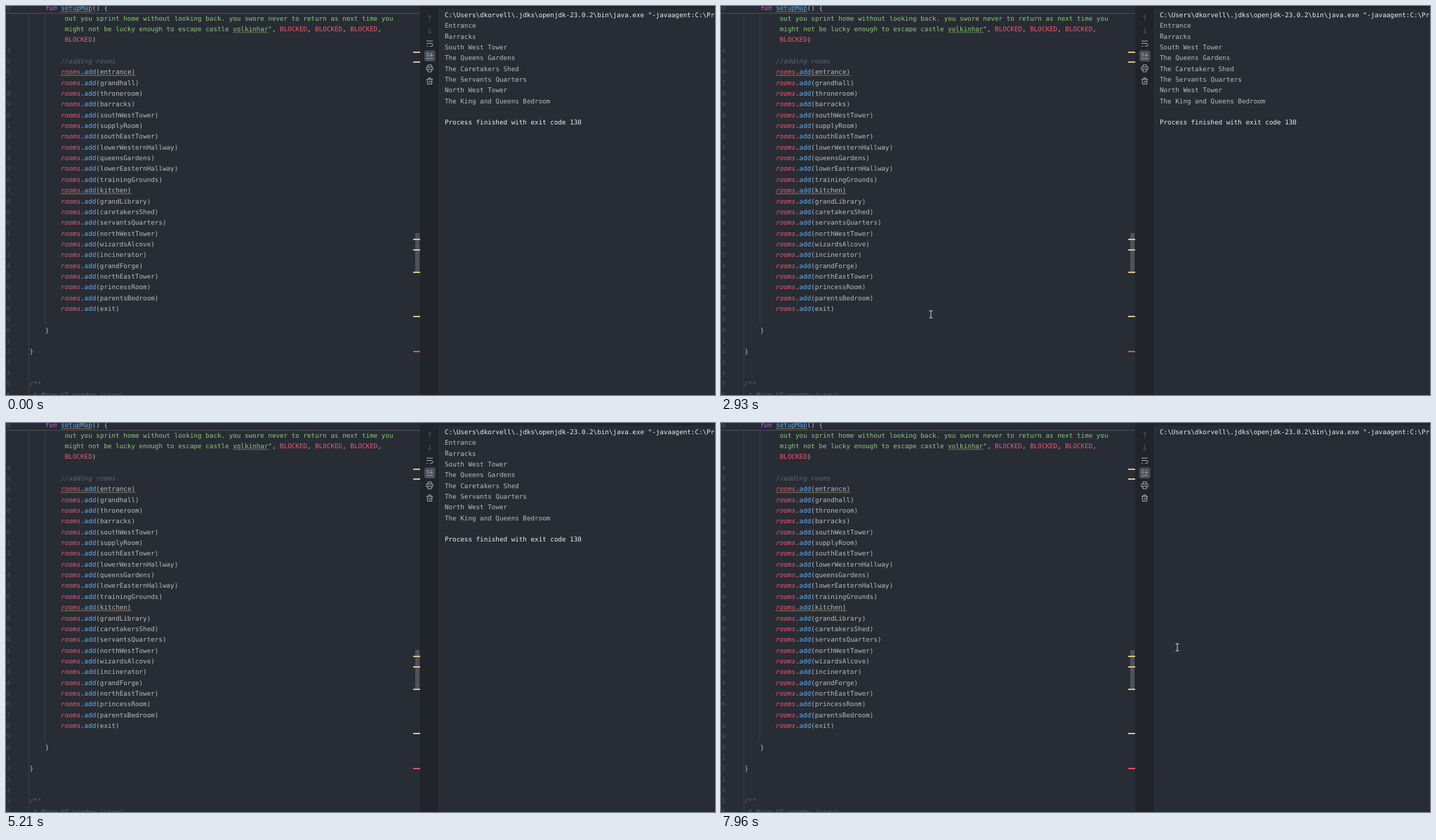
An HTML page that plays this animation: 1010 px wide and 555 px high, repeating every 8 s.

```html
<!DOCTYPE html>
<html lang="en">
<head>
<meta charset="utf-8">
<title>Code editor and console</title>
<style>
  html, body { margin: 0; width: 100%; height: 100%; overflow: hidden; background: #282c34; }
  svg { display: block; width: 1010px; height: 555px; }
  /* The tiny turn keeps baselines on fractional pixels. */
  #editor, #command, #output { transform: rotate(.01deg); }
  text {
    font: 9.26px "DejaVu Sans Mono", monospace;
    white-space: pre;
    text-rendering: geometricPrecision;
    fill: #bbbbbb;
  }
  .number { fill: #495162; text-anchor: end; }
  .keyword { fill: #d55fde; font-style: italic; }
  .call { fill: #61afef; }
  .field { fill: #ef596f; font-style: italic; }
  .constant { fill: #ef596f; }
  .string { fill: #89ca78; }
  .comment { fill: #5c6370; font-style: italic; }
  .system { fill: #eceef1; }
  .wave { fill: none; stroke: #a8925b; stroke-width: .8; }
  .typo { stroke: #6d9a62; }
  .icon { fill: none; stroke: #b4b7be; stroke-width: .9; }
  .dim { stroke: #50555f; }
</style>
</head>
<body>
<svg viewBox="0 0 1010 555">
  <rect width="1010" height="555" fill="#282c34"/>
  <path d="M32.5 11V555M55.5 11V454" stroke="#3b4048"/>
  <path d="M0 10.5H590" stroke="#4b5059"/>
  <g id="editor"></g>

  <rect id="thumb" x="583" y="324" width="6" height="57" fill="#fff"/>
  <g id="marks"></g>

  <rect x="590" width="27" height="555" fill="#21252b"/>
  <rect x="590" width="420" height="3.5" fill="#21252b"/>
  <path d="M617.5 4V555" stroke="#2f333b"/>
  <rect x="596" y="63.5" width="15.5" height="15.5" rx="3" fill="#4b5059"/>
  <g class="icon">
    <g class="dim">
      <path id="arrow" d="M603.5 21v-8m-3 3l3-3l3 3"/>
      <use href="#arrow" transform="rotate(180 603.5 26)"/>
    </g>
    <path d="M599 50h9m-9 3.5h7a2 2 0 0 1 0 4h-2m-5 0h2"/>
    <path d="M599 68h4m-4 3h4m-4 4h9m-2-8v5m-2-2l2 2l2-2"/>
    <path d="M601 87v-3h5v3m-5 4h-2v-4h9v4h-2m-5-1h5v4h-5z"/>
    <path d="M599 104.5h9m-6 0v-2h3v2m-5 0l.5 7h6l.5-7m-4 2v3m2-3v3"/>
  </g>
  <g id="command"></g>
  <g id="output"></g>

  <path id="cursor" d="M-2.5-5h5M0-5V5M-2.5 5h5" fill="none" stroke="#d0d2d6"/>
</svg>
<script>
const LOOP = 8000, STEP = 67.46;
const CHAR = 5.575, LINE = 15.35;
const LEFT = 33.6, FIRST_ROW = 97.3, CONSOLE_X = 625, CONSOLE_Y = 15.7;
const byId = id => document.getElementById(id);

function add(parent, tag, attributes, content = '') {
  const node = document.createElementNS('http://www.w3.org/2000/svg', tag);
  for (const key in attributes) node.setAttribute(key, attributes[key]);
  node.textContent = content;
  return parent.appendChild(node);
}

const editor = byId('editor');
const rowY = row => FIRST_ROW + row * LINE;

// Spans are alternating class names and texts.
function code(row, column, ...spans) {
  const line = add(editor, 'text', { x: LEFT + column * CHAR, y: rowY(row) });
  for (let i = 0; i < spans.length; i += 2) add(line, 'tspan', { class: spans[i] }, spans[i + 1]);
}

function wave(row, column, length, kind = '') {
  const d = `M${LEFT + column * CHAR} ${rowY(row) + 2.4}` + 'l1.4 -1.6l1.4 1.6'.repeat(Math.round(length * CHAR / 2.8));
  add(editor, 'path', { d, class: 'wave ' + kind });
}

const number = (row, value) => add(editor, 'text', { x: 6.5, y: rowY(row), class: 'number' }, value);

const HEADER = -5.92;
number(HEADER, '60');
code(HEADER, 4, 'keyword', 'fun ', 'call', 'setupMap', '', '() {');
wave(HEADER, 8, 8);

const blocked = ['', ', ', 'constant', 'BLOCKED'];
code(-5, 9, 'string', 'out you sprint home without looking back. you swore never to return as next time you');
code(-4, 9, 'string', 'might not be lucky enough to escape castle volkinhar"', ...blocked, ...blocked, ...blocked, '', ',');
wave(-4, 52, 9, 'typo');
code(-3, 9, 'constant', 'BLOCKED', '', ')');
code(-1, 8, 'comment', '//adding rooms');

const rooms = `entrance grandhall throneroom barracks southWestTower supplyRoom southEastTower
  lowerWesternHallway queensGardens lowerEasternHallway trainingGrounds kitchen grandLibrary
  caretakersShed servantsQuarters northWestTower wizardsAlcove incinerator grandForge
  northEastTower princessRoom parentsBedroom exit`.split(/\s+/);
rooms.forEach((room, row) => {
  code(row, 8, 'field', 'rooms', '', '.', 'call', 'add', '', `(${room})`);
  if (room === 'entrance' || room === 'kitchen') wave(row, 8, room.length + 11);
});
code(24, 4, '', '}');
code(26, 0, '', '}');
code(29, 0, 'comment', '/**');
code(30, 0, 'comment', ' * Main UI window (view)');
for (let row = -2; row <= 30; row++) number(row, 86 + row);

const mark = (y, fill) => add(byId('marks'), 'rect', { x: 580, y: y - 1, width: 10, height: 2, fill });
for (const y of [66, 80, 333, 348, 380, 443]) mark(y, '#d8c188');
mark(493, '#d9525f');

const print = (id, row, text, kind = '') =>
  add(byId(id), 'text', { x: CONSOLE_X, y: CONSOLE_Y + row * LINE, class: kind }, text);

print('command', 0, 'C:\\Users\\dkorvell\\.jdks\\openjdk-23.0.2\\bin\\java.exe "-javaagent:C:\\Program Files', 'system');
['Entrance', 'Barracks', 'South West Tower', 'The Queens Gardens', 'The Caretakers Shed',
  'The Servants Quarters', 'North West Tower', 'The King and Queens Bedroom']
  .forEach((name, i) => print('output', i + 1, name));
print('output', 10, 'Process finished with exit code 130', 'system');

// Pointer visits: start, end and key points as [time, x, y].
const visits = [
  { start: 690, end: 5205, path: [
    [690, 843, 440], [1365, 76, 61.5], [2250, 190, 275], [2916, 299, 440],
    [3660, 150, 51], [3860, 39, 142.5], [4000, 20, 534], [4470, 311, 420], [4870, 289, 185], [5145, 29, 51]] },
  { start: 5470, end: 5875, path: [[5470, 66, 126], [5810, 698, 8]] },
  { start: 7610, end: LOOP, path: [[7610, 712, 97], [7947, 650, 320]] }
];

// Smooth curve through the key points.
function pointOn(path, t) {
  const last = path.length - 1;
  if (t >= path[last][0]) return path[last].slice(1);
  const i = path.findIndex(p => p[0] > t) - 1;
  const a = path[i], b = path[i + 1], span = b[0] - a[0], u = (t - a[0]) / span;
  const slope = (k, axis) => {
    const p = path[Math.max(0, k - 1)], n = path[Math.min(last, k + 1)];
    return (n[axis] - p[axis]) / (n[0] - p[0]) * span;
  };
  return [1, 2].map(axis =>
    a[axis] * (1 + 2 * u) * (1 - u) ** 2 + slope(i, axis) * u * (1 - u) ** 2 +
    b[axis] * u * u * (3 - 2 * u) + slope(i + 1, axis) * u * u * (u - 1));
}

const show = (id, visible) => byId(id).setAttribute('visibility', visible ? 'visible' : 'hidden');
const ramp = (t, from, to) => Math.min(1, Math.max(0, (t - from) / (to - from)));

function draw(now) {
  const t = now % LOOP;
  const visit = visits.find(v => t >= v.start && t < v.end);
  show('cursor', visit);
  if (visit) {
    const held = visit.start + Math.floor((t - visit.start) / STEP) * STEP;
    byId('cursor').setAttribute('transform', `translate(${pointOn(visit.path, held)})`);
  }
  byId('thumb').setAttribute('opacity', .18 + .16 * (ramp(t, 800, 1000) - ramp(t, 1550, 1950)));
  show('output', t < 7755);
  show('command', t < 7755 || t >= 7885);
  requestAnimationFrame(draw);
}
requestAnimationFrame(draw);
</script>
</body>
</html>
```
